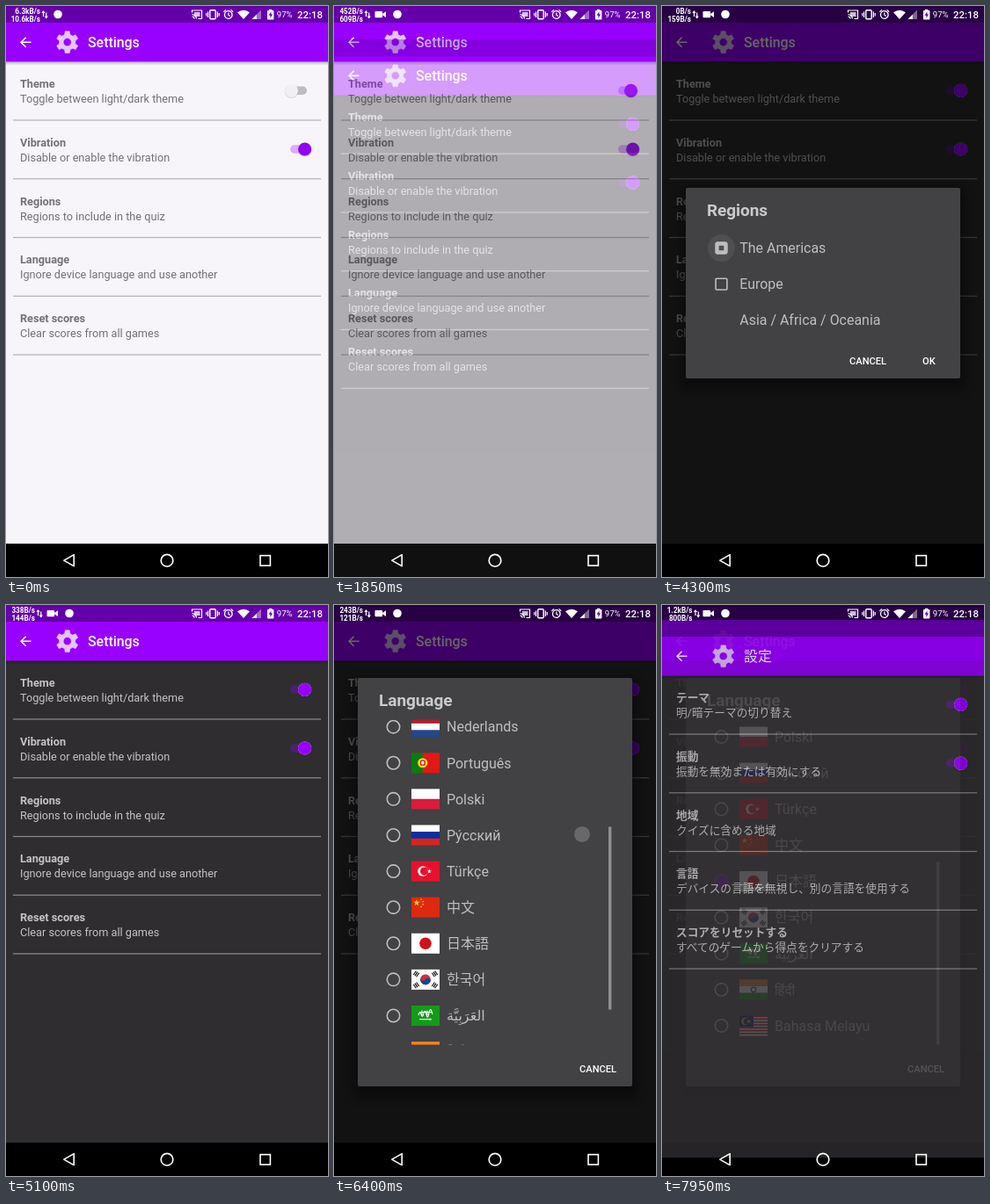
Animation of 366 by 650 pixels, one loop 8000 ms. Source, as an HTML page:

```html
<!DOCTYPE html>
<html lang="en">
<head>
<meta charset="utf-8">
<title>Quiz settings</title>
<style>
  html, body { margin: 0; width: 100%; height: 100%; overflow: hidden; background: #000; }
  svg { display: block; width: 366px; height: 650px; }
  text { font-family: Roboto, "Noto Sans", "Noto Sans CJK JP", "Noto Sans CJK KR", "Noto Sans CJK SC", sans-serif; white-space: pre; }
</style>
</head>
<body>
<svg id="stage" viewBox="0 0 366 650" xmlns="http://www.w3.org/2000/svg"></svg>
<script>
const LOOP = 8000;
const PURPLE = '#9800ff';
const ROW = 41.1, LIST_TOP = 130.5, LIST_H = 370, MAX_SCROLL = 7 * ROW;

const THEMES = {
  light: { bg: '#f8f5fa', text: '#737174', line: '#b3b0b5', thumb: '#9000f6' },
  dark: { bg: '#2f2d30', text: '#c4c3c4', line: '#8d8b8e', thumb: '#9600ff' }
};
const EN = ['Settings',
  ['Theme', 'Toggle between light/dark theme'],
  ['Vibration', 'Disable or enable the vibration'],
  ['Regions', 'Regions to include in the quiz'],
  ['Language', 'Ignore device language and use another'],
  ['Reset scores', 'Clear scores from all games']];
const JA = ['設定',
  ['テーマ', '明/暗テーマの切り替え'],
  ['振動', '振動を無効または有効にする'],
  ['地域', 'クイズに含める地域'],
  ['言語', 'デバイスの言語を無視し、別の言語を使用する'],
  ['スコアをリセットする', 'すべてのゲームから得点をクリアする']];

// SVG helpers
const text = (x, y, s, size, fill, weight = 400, more = '') =>
  `<text x="${x}" y="${y}" font-size="${size}" fill="${fill}" font-weight="${weight}" ${more}>${s}</text>`;
const rect = (x, y, w, h, fill, more = '') =>
  `<rect x="${x}" y="${y}" width="${w}" height="${h}" fill="${fill}" ${more}/>`;
const disc = (x, y, r, fill, more = '') => `<circle cx="${x}" cy="${y}" r="${r}" fill="${fill}" ${more}/>`;
const ring = (x, y, r, color, w) => disc(x, y, r, 'none', `stroke="${color}" stroke-width="${w}"`);
const path = (d, fill, more = '') => `<path d="${d}" fill="${fill}" ${more}/>`;
const line = (d, color, w, more = '') => path(d, 'none', `stroke="${color}" stroke-width="${w}" ${more}`);
const group = (x, y, body, more = '') => `<g transform="translate(${x} ${y})" ${more}>${body}</g>`;

function gear(cx, cy) {
  const pts = [];
  for (let i = 0; i < 6; i++) {
    const a = i * Math.PI / 3 - Math.PI / 2;
    for (const [r, da] of [[9.2, -.34], [12.6, -.2], [12.6, .2], [9.2, .34]])
      pts.push((cx + r * Math.cos(a + da)).toFixed(2) + ' ' + (cy + r * Math.sin(a + da)).toFixed(2));
  }
  const hole = `M${cx - 4.6} ${cy}a4.6 4.6 0 1 0 9.2 0a4.6 4.6 0 1 0 -9.2 0z`;
  return path(`M${pts.join('L')}z${hole}`, '#e6c4ff', 'fill-rule="evenodd" stroke="#e6c4ff" stroke-width=".7" stroke-linejoin="round"');
}

function toggle(y, theme, id) {
  const c = THEMES[theme];
  return group(0, y,
    `<g class="off" opacity="0">${rect(323, -4.7, 19, 9.4, '#bdbbbe', 'rx="4.7"')}</g>` +
    `<g class="on">${rect(323, -4.7, 19, 9.4, PURPLE, 'rx="4.7" opacity=".3"')}</g>` +
    `<g class="knob" transform="translate(339.6 0)">${disc(0, .9, 7.9, '#000', 'opacity=".12"')}` +
    `${disc(0, 0, 7.6, '#f1eff2')}${disc(0, 0, 7.6, c.thumb, 'class="on"')}</g>`, `id="${id}"`);
}

function screen(id, theme, [title, ...rows]) {
  const c = THEMES[theme];
  const list = rows.map(([head, sub], i) => {
    const y = i * 66.75;
    return text(16, 93 + y, head, 12.7, c.text, 700) + text(16, 110 + y, sub, 12.7, c.text) +
      rect(8, 129.4 + y, 350, 1.2, c.line);
  }).join('');
  return `<g id="${id}">` + rect(0, 0, 366, 612, c.bg) + rect(0, 0, 366, 19, '#6400aa') +
    rect(0, 63.5, 366, 4, 'url(#edge)') + rect(0, 19, 366, 44.5, PURPLE) +
    line('M28.5 41.2H17.3M22.6 35.7L17.1 41.2L22.6 46.7', '#fff', 1.6) +
    gear(69.7, 41.2) + text(93, 46.8, title, 15.9, '#fff', 500) + list +
    toggle(96.3, theme, id + 'Theme') + toggle(163, theme, id + 'Vibration') + '</g>';
}

// Flags, 32 by 23
const W = 32, H = 23;
const rows = (...cs) => cs.map((c, i) => rect(0, i * H / cs.length, W, H / cs.length + .02, c)).join('');
const cols = (...cs) => cs.map((c, i) => rect(i * W / cs.length, 0, W / cs.length + .02, H, c)).join('');
const plain = c => rect(0, 0, W, H, c);
function star(x, y, r, fill) {
  const pts = [];
  for (let i = 0; i < 10; i++) {
    const a = i * Math.PI / 5 - Math.PI / 2, q = i % 2 ? r * .4 : r;
    pts.push((x + q * Math.cos(a)).toFixed(2) + ' ' + (y + q * Math.sin(a)).toFixed(2));
  }
  return path(`M${pts.join('L')}z`, fill);
}
const bars = (x, y, a) => `<g transform="translate(${x} ${y}) rotate(${a})">` +
  [-2, 0, 2].map(d => rect(-2.7, d - .6, 5.4, 1.2, '#111')).join('') + '</g>';
const stripes = () => Array.from({ length: 14 }, (_, i) => rect(0, i * H / 14, W, H / 14, i % 2 ? '#fff' : '#cc1020')).join('');

const LANGS = [
  ['English', plain('#1f3a7d') + line('M0 0L32 23M32 0L0 23', '#fff', 4) + line('M0 0L32 23M32 0L0 23', '#cf142b', 1.4) +
    line('M16 0V23M0 11.5H32', '#fff', 7) + line('M16 0V23M0 11.5H32', '#cf142b', 4)],
  ['Deutsch', rows('#000', '#dd0000', '#ffce00')],
  ['Español', rows('#c60b1e', '#ffc400', '#ffc400', '#c60b1e') + rect(7, 8.5, 5, 6, '#ad4a20')],
  ['Français', cols('#0b2f90', '#fff', '#ed2939')],
  ['Italiano', cols('#009246', '#fff', '#ce2b37')],
  ['Nederlands', rows('#b01f2b', '#fff', '#21468b')],
  ['Português', plain('#e01818') + rect(0, 0, 12.8, H, '#0a7a14') + disc(12.8, 11.5, 5.6, '#f5dd20') +
    rect(9.9, 8.2, 5.8, 6.4, '#e01818', 'rx="1.6"') + rect(11.3, 9.5, 3, 3.8, '#fff', 'rx="1"')],
  ['Polski', rows('#fff', '#dc1a3c')],
  ['Рýсский', rows('#fff', '#0a2fa6', '#d8241c')],
  ['Türkçe', plain('#e8112d') + disc(13, 11.5, 5.8, '#fff') + disc(14.6, 11.5, 4.6, '#e8112d') + star(20.3, 11.5, 2.7, '#fff')],
  ['中文', plain('#de2910') + star(6, 6.3, 3.7, '#ffde00') +
    [[11, 2.5], [13.2, 5], [13.2, 8.3], [11, 10.8]].map(p => star(...p, 1.3, '#ffde00')).join('')],
  ['日本語', plain('#fff') + disc(16, 11.5, 6.8, '#d0101c')],
  ['한국어', plain('#fff') + group(16, 11.5, `<g transform="rotate(28)">${disc(0, 0, 5.9, '#cd2e3a')}` +
    path('M-5.9 0A2.95 2.95 0 0 0 0 0A2.95 2.95 0 0 1 5.9 0A5.9 5.9 0 0 1 -5.9 0z', '#0a47a0') + '</g>') +
    bars(5.5, 5, -56) + bars(26.5, 5, 56) + bars(5.5, 18, 56) + bars(26.5, 18, -56)],
  ['العَرَبِيَّة', plain('#159a1c') + line('M8 11Q9.5 5 11 10T14 9T17 10T20 8.5T24 10M9 7.5H23M12 5.5V11M18 5.5V11', '#fff', 1.1) +
    line('M9 15.7H23M21 14.5V17', '#fff', 1)],
  ['हिंदी', rows('#f58220', '#fff', '#138808') + ring(16, 11.5, 2.8, '#1a1a90', 1.1)],
  ['Bahasa Melayu', stripes() + rect(0, 0, 16, 13.1, '#101070') + disc(6.5, 6.6, 4.2, '#fc0') +
    disc(8, 6.6, 3.6, '#101070') + star(10.6, 6.6, 2.7, '#fc0')]
];

const INK = '#bfbebf';
const panel = (y, h) => rect(21, y, 324, h + 14, '#000', 'rx="6" opacity=".35" filter="url(#soft)"') +
  rect(27, y, 312, h, '#424143', 'rx="2"');
const dialogTitle = (y, s) => text(51, y + 32, s, 19, '#cbcacb', 700, 'letter-spacing="-.05"');
const button = (x, y, s) => text(x, y, s, 11.1, '#fff', 500);

const REGIONS = ['The Americas', 'Europe', 'Asia / Africa / Oceania'];
const regionsDialog = () => `<g id="regions">` + panel(207, 217) + dialogTitle(207, 'Regions') +
  REGIONS.map((name, i) => group(67.5, 275.5 + i * ROW,
    disc(0, 0, 15.5, '#fff', 'class="halo" opacity="0"') +
    `<rect class="box" rx="1"/>` +
    line('M-4 .2L-1.2 3L4.4 -2.8', '#353336', 1.8, 'class="tick"') +
    text(20.8, 5.7, name, 15.95, INK), `class="check"`)).join('') +
  button(213, 407.5, 'CANCEL') + button(296, 407.5, 'OK') + '</g>';

const languageDialog = () => `<g id="language">` + panel(83, 465) + dialogTitle(83, 'Language') +
  `<g clip-path="url(#list)"><g id="items">` +
  LANGS.map(([name, flag], i) => group(0, 151 + i * ROW - .9,
    ring(67.5, 0, 7.2, INK, 1.6) + group(88, -11.5, flag) + text(128, 5.8, name, 16, INK))).join('') +
  `<g id="pick">${ring(67.5, 150.1 + 11 * ROW, 7.2, PURPLE, 1.8)}${disc(67.5, 150.1 + 11 * ROW, 3.8, PURPLE)}</g>` +
  `</g></g>` + rect(312, LIST_TOP, 3.4, 208, '#8f8e90', 'id="bar"') + button(279, 531.5, 'CANCEL') + '</g>';

const statusIcons = () => `<g id="net" font-weight="700">` +
  `<text id="up" y="9.3" font-size="8.2" fill="#fff" text-anchor="end"></text>` +
  `<text id="down" y="18" font-size="8.2" fill="#fff" text-anchor="end"></text></g>` +
  `<g id="arrows">${line('M-1.5 12V6M1.8 7.5V13.5', '#fff', 1.2)}${path('M-3.6 8L-1.5 5L.6 8zM-.3 11.5L1.8 14.5L3.9 11.5z', '#fff')}</g>` +
  `<g id="camera">${rect(46.5, 6, 8.6, 7.2, '#fff', 'rx="1"')}${path('M55 9L59 6.2V13L55 10.2z', '#fff')}</g>` +
  `<g id="app">${disc(0, 9.5, 4.8, '#fff')}</g>` +
  line('M211.5 7.5V5H222.5V14.5H218.5M211.5 9.6A4.9 4.9 0 0 1 216.4 14.5M211.5 12A2.5 2.5 0 0 1 214 14.5', '#fff', 1.2) +
  rect(214, 7, 6.5, 5, '#fff', 'opacity=".75"') +
  rect(231.8, 4.7, 6.4, 10, 'none', 'rx="1" stroke="#fff" stroke-width="1.4"') + line('M229.6 6.5V13M240.4 6.5V13M227.8 8V11.5M242.2 8V11.5', '#fff', 1.2) +
  ring(252.8, 10, 4.3, '#fff', 1.3) + line('M252.8 7.5V10.2L254.8 11.5M247.4 6.7L250 4.4M258.2 6.7L255.6 4.4', '#fff', 1.2) +
  path('M263 7.3Q270 2.2 277 7.3L270 15z', '#fff') +
  path('M290 4.5V15H279.5z', '#fff', 'opacity=".4"') + path('M284.8 9.7V15H279.5z', '#fff') +
  rect(297, 5, 7.4, 10.5, '#fff', 'rx=".8"') + rect(299, 3.8, 3.4, 2, '#fff') + path('M301.4 6.4L298.6 10.8H300.4V14L303 9.6H301.4z', '#6400aa') +
  text(307.8, 13, '97%', 9.6, '#fff') + text(331, 13.6, '22:18', 11.4, '#fff', 500);

const navIcons = () => line('M77.2 624.6V637.6L65.8 631.1z', '#fff', 1.6, 'stroke-linejoin="round"') +
  ring(183, 631.2, 6.8, '#fff', 1.7) + rect(289, 625.6, 11.4, 11.4, 'none', 'stroke="#fff" stroke-width="1.6"');

const $ = id => document.getElementById(id);
$('stage').innerHTML = `<defs>
  <linearGradient id="edge" x2="0" y2="1"><stop stop-color="#000" stop-opacity=".26"/><stop offset="1" stop-color="#000" stop-opacity="0"/></linearGradient>
  <filter id="soft" x="-10%" y="-10%" width="120%" height="125%"><feGaussianBlur stdDeviation="6"/></filter>
  <clipPath id="list">${rect(27, LIST_TOP, 312, LIST_H, '#000')}</clipPath></defs>` +
  rect(0, 0, 366, 650, '#000') + screen('light', 'light', EN) + screen('dark', 'dark', EN) +
  rect(0, 0, 366, 612, '#000', 'id="dim"') + regionsDialog() + languageDialog() +
  screen('ja', 'dark', JA) + statusIcons() + navIcons() + disc(0, 0, 9, '#999', 'id="dot"');

// Timeline
const NET = [[0, '6.3kB/s', '10.6kB/s', 39], [600, '517B/s', '284B/s', 33], [1600, '452B/s', '609B/s', 33],
  [2600, '337B/s', '142B/s', 33], [3600, '0B/s', '159B/s', 33], [4600, '338B/s', '144B/s', 33],
  [5600, '243B/s', '121B/s', 33], [6600, '311B/s', '130B/s', 33], [7600, '1.2kB/s', '800B/s', 34.5]];
// start, end, x, y, x and y at the end of a drag
const TAPS = [[300, 430, 350, 163], [800, 960, 350, 163], [1550, 1680, 350, 96], [2550, 2790, 235, 231],
  [3550, 3700, 230, 317], [4000, 4150, 230, 276], [4450, 4700, 304, 409], [5400, 5600, 235, 300],
  [6000, 6450, 282, 465, 282, 236], [7150, 7400, 230, 315]];
const SCROLL = [[6000, 0], [6400, 216.5], [6450, 238], [6950, MAX_SCROLL]];
const UNCHECK = [4120, 3650, Infinity];

const ramp = (t, a, b) => Math.min(1, Math.max(0, (t - a) / (b - a)));
const smooth = p => p * p * (3 - 2 * p);
const fade = (t, a, b, c, d) => ramp(t, a, b) * (1 - ramp(t, c, d));
const set = (el, attrs) => { for (const k in attrs) el.setAttribute(k, attrs[k]); };
const show = (el, o) => set(el, { opacity: o, visibility: o > 0 ? 'visible' : 'hidden' });

function openWindow(id, t, start) {
  const slide = 52 * (1 - ramp(t, start, start + 350)) ** 5;
  show($(id), 1 - (1 - ramp(t, start, start + 200)) ** 4);
  set($(id), { transform: `translate(0 ${slide})` });
}

function setToggle(id, p) {
  const g = $(id);
  g.querySelectorAll('.on').forEach(e => set(e, { opacity: p }));
  set(g.querySelector('.off'), { opacity: 1 - p });
  set(g.querySelector('.knob'), { transform: `translate(${324.5 + 15.1 * p} 0)` });
}

function setCheck(g, t, start) {
  const hole = 5.6 * ramp(t, start + 125, start + 235), w = 7.2 - hole, off = t >= start;
  set(g.querySelector('.box'), {
    x: -7.2 + w / 2, y: -7.2 + w / 2, width: 14.4 - w, height: 14.4 - w,
    fill: hole > 0 ? 'none' : off ? INK : PURPLE, stroke: off ? INK : PURPLE, 'stroke-width': w
  });
  const k = 1 - ramp(t, start, start + 120);
  set(g.querySelector('.tick'), { transform: `scale(${k})`, opacity: k > 0 ? 1 : 0 });
  set(g.querySelector('.halo'), {
    opacity: .07 * fade(t, start - 60, start + 60, start + 200, start + 320),
    r: 8 + 7.5 * ramp(t, start - 60, start + 120)
  });
}

function scrollAt(t) {
  const i = SCROLL.findIndex(s => s[0] > t);
  if (i === 0) return 0;
  if (i < 0) return MAX_SCROLL;
  const [a, from] = SCROLL[i - 1], [b, to] = SCROLL[i];
  const p = ramp(t, a, b);
  return from + (to - from) * (i === 3 ? 1 - (1 - p) ** 3 : p);
}

function render(t) {
  const [, up, down, right] = NET.filter(n => n[0] <= t).pop();
  $('up').textContent = up;
  $('down').textContent = down;
  set($('up'), { x: right });
  set($('down'), { x: right });
  set($('arrows'), { transform: `translate(${right + 5} 0)` });
  show($('camera'), t < 50 ? 0 : 1);
  set($('app'), { transform: `translate(${t < 50 ? 59 : 72} 0)` });

  setToggle('lightVibration', 1 - smooth(ramp(t, 400, 640)) + smooth(ramp(t, 960, 1200)));
  setToggle('lightTheme', smooth(ramp(t, 1660, 1910)));
  openWindow('dark', t, 1830);
  openWindow('ja', t, 7881);

  show($('regions'), fade(t, 2705, 2900, 4800, 5020));
  show($('language'), ramp(t, 5590, 5800));
  show($('dim'), .6 * (fade(t, 2750, 2950, 4820, 5060) + ramp(t, 5630, 5850)));
  document.querySelectorAll('.check').forEach((g, i) => setCheck(g, t, UNCHECK[i]));

  const s = scrollAt(t);
  set($('items'), { transform: `translate(0 ${-s})` });
  set($('bar'), { y: LIST_TOP + s * LIST_H / (16 * ROW) });
  show($('pick'), ramp(t, 7400, 7520));

  const tap = TAPS.find(p => t >= p[0] && t < p[1] + 60);
  show($('dot'), tap ? .45 * (1 - ramp(t, tap[1], tap[1] + 60)) : 0);
  if (tap) {
    const [a, b, x, y, x2 = x, y2 = y] = tap, p = ramp(t, a, b);
    set($('dot'), { cx: x + (x2 - x) * p, cy: y + (y2 - y) * p });
  }
}

const begin = performance.now();
function tick() {
  render((performance.now() - begin) % LOOP);
  requestAnimationFrame(tick);
}
tick();
</script>
</body>
</html>
```
